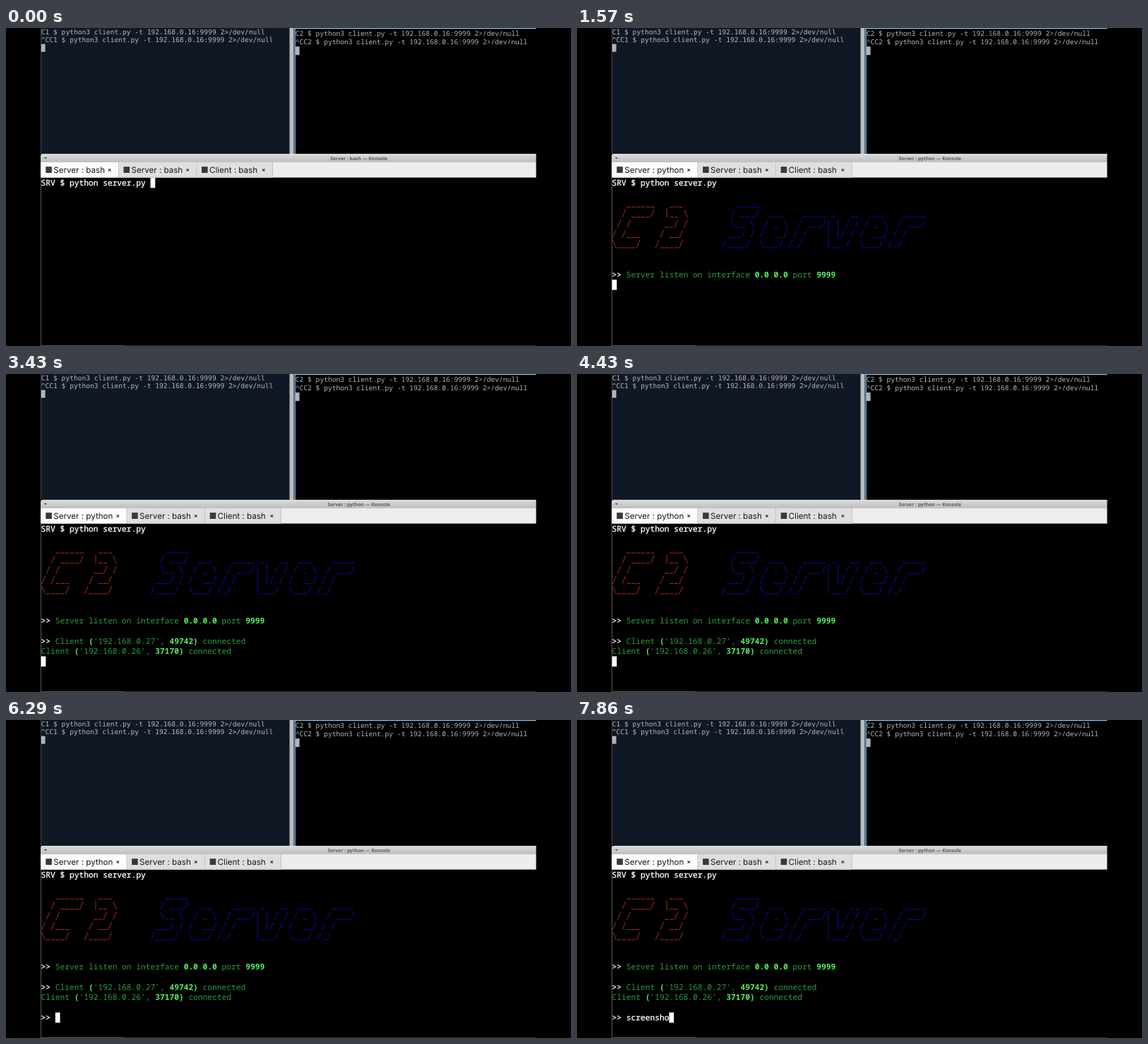
An HTML page with a canvas that plays this animation: 800 px wide and 450 px high, repeating every 8 s.

```html
<!DOCTYPE html>
<html lang="en">
<head>
<meta charset="utf-8">
<title>Terminal session</title>
<style>
html, body { margin: 0; width: 100%; height: 100%; overflow: hidden; background: #000; }
canvas { display: block; width: 800px; height: 450px; }
</style>
</head>
<body>
<canvas id="stage" width="800" height="450"></canvas>
<script>
const ctx = document.getElementById('stage').getContext('2d');
const LOOP = 8000;
const WHITE = '#fcfcfc', GREEN = '#2f9c3c', BRIGHT = '#54f060', RED = '#b62d1f', BLUE = '#0e0eae';
const EDGE = 750.6, BAR_BOTTOM = 211.6;

// Moments at which the terminal output changes, in ms
const AT = { enter: 860, title: 1140, banner: 1430, prompt: 2860, first: 3140, second: 3290, again: 4710 };
const TYPED = 'screensho';
const typingTimes = [...TYPED].map((_, i) => i ? 6710 + 143.5 * i : 6570);

const C2_ART = [
  '   ______   ___',
  '  / ____/  |__ \\',
  ' / /       __/ /',
  '/ /___    / __/',
  '\\____/   /____/'
];
const SERVER_ART = [
  '   _____',
  '  / ___/  ___    _____ _   __  ___    _____',
  '  \\__ \\  / _ \\  / ___/| | / / / _ \\  / ___/',
  ' ___/ / /  __/ / /    | |/ / /  __/ / /',
  '/____/  \\___/ /_/     |___/  \\___/ /_/'
];

// Line ends of the banner's characters, as x in a cell and y from the baseline
const STROKES = {
  '_': [0.5, 1.6, 6.2, 1.6],
  '/': [1, 1.9, 5.8, -9.2],
  '\\': [1, -9.2, 5.8, 1.9],
  '|': [3.4, 2.5, 3.4, -10.4]
};

const main = { x: 49.6, base: 222.8, top: 211.9, cell: 6.735, line: 14.43, size: 11.225, font: '"Noto Sans Mono", monospace' };
const left = { x: 49.8, base: 9.3, top: 0.7, cell: 5.764, line: 11, size: 9.57, font: '"DejaVu Sans Mono", monospace' };
const right = { x: 409.8, base: 11.3, top: 2.2, cell: 5.764, line: 12, size: 9.607, font: '"Noto Sans Mono", monospace' };

function rect(x, y, w, h, color) {
  ctx.fillStyle = color;
  ctx.fillRect(x, y, w, h);
}

function line(x1, y1, x2, y2) {
  ctx.beginPath();
  ctx.moveTo(x1, y1);
  ctx.lineTo(x2, y2);
  ctx.stroke();
}

// Writes text on a terminal's character grid and returns the next column
function write(term, row, col, text, color, weight = 400) {
  ctx.font = `${weight === 700 ? 700 : 400} ${term.size}px ${term.font}`;
  ctx.textAlign = 'left';
  ctx.fillStyle = ctx.strokeStyle = color;
  ctx.lineWidth = 0.35;
  const y = term.base + row * term.line;
  for (const ch of text) {
    const x = term.x + col++ * term.cell;
    if (ch === ' ') continue;
    ctx.fillText(ch, x, y);
    if (weight === 500) ctx.strokeText(ch, x, y);
  }
  return col;
}

function writeSpans(row, spans) {
  let col = 0;
  for (const [text, color, weight] of spans) col = write(main, row, col, text, color, weight);
}

function cursor(term, row, col, color) {
  rect(term.x + col * term.cell, term.top + row * term.line, term.cell, term.line, color);
}

function clientPane(term, name) {
  const command = `${name} $ python3 client.py -t 192.168.0.16:9999 2>/dev/null`;
  write(term, 0, 0, command, '#b8b8b8');
  write(term, 1, 0, '^C' + command, '#b8b8b8');
  cursor(term, 2, 0, '#b4b4b4');
}

function drawTop() {
  rect(49, 0, 353, 178, '#111825');
  rect(49, 0, 0.6, 178, '#606468');
  rect(401.5, 0, 6, 178, '#b9bbc1');
  rect(408.3, 0, 1.6, 178, '#6fa9d4');
  rect(408.3, 0, EDGE - 408.3, 1.2, '#8fc1e6');
  clientPane(left, 'C1');
  clientPane(right, 'C2');
}

function tab(x, width, label, active) {
  rect(x, 190, width, BAR_BOTTOM - 190, active ? '#fcfcfc' : '#dfdfdf');
  if (!active) rect(x, BAR_BOTTOM - 1.5, width, 1.5, '#d2d2d2');
  rect(x + width - 0.5, 190, 1, BAR_BOTTOM - 190, '#bdbdbd');
  const icon = active ? 56.3 : x + 6;
  rect(icon, 196.2, 8.6, 8.8, '#38393b');
  ctx.font = '11.6px Inter, sans-serif';
  ctx.textAlign = 'left';
  ctx.fillStyle = '#18191a';
  ctx.fillText(label, icon + 11, 205.1);
  const cx = x + width - 12.8, cy = 201;
  ctx.strokeStyle = '#333';
  ctx.lineWidth = 1.2;
  line(cx - 1.7, cy - 1.7, cx + 1.7, cy + 1.7);
  line(cx + 1.7, cy - 1.7, cx - 1.7, cy + 1.7);
}

function drawWindow(job) {
  const shift = job === 'python' ? 11.6 : 0;
  const width = EDGE - 49;
  const bar = ctx.createLinearGradient(0, 178, 0, 190);
  bar.addColorStop(0, '#dcdcdc');
  bar.addColorStop(1, '#bebebe');
  ctx.fillStyle = bar;
  ctx.beginPath();
  ctx.roundRect(49, 178, width, 12, [3, 0, 0, 0]);
  ctx.fill();
  ctx.fillStyle = '#444';
  ctx.beginPath();
  ctx.moveTo(53.8, 183);
  ctx.lineTo(58, 183);
  ctx.lineTo(55.9, 185.3);
  ctx.fill();
  ctx.font = 'bold 6.8px "Noto Sans", sans-serif';
  ctx.textAlign = 'center';
  ctx.fillStyle = '#5a5a5a';
  ctx.fillText(`Server : ${job} — Konsole`, 499.7, 186.7);

  rect(49, 190, width, BAR_BOTTOM - 190, '#ededed');
  tab(49, 110.5 + shift, 'Server : ' + job, true);
  tab(160.5 + shift, 109.5, 'Server : bash', false);
  tab(271 + shift, 106.5, 'Client : bash', false);

  rect(49, BAR_BOTTOM, 0.8, 450 - BAR_BOTTOM, '#707070');
  rect(49, 449, 119, 1, '#585858');
  rect(168, 449, EDGE - 168, 1, '#2e2e2e');
}

function drawArt(rows, startCol, color) {
  ctx.strokeStyle = color;
  ctx.lineWidth = 0.95;
  rows.forEach((text, i) => {
    const y = main.base + (2 + i) * main.line;
    [...text].forEach((ch, col) => {
      if (ch === ' ') return;
      const x = main.x + (startCol + col) * main.cell;
      const [x1, y1, x2, y2] = STROKES[ch];
      line(x + x1, y + y1, x + x2, y + y2);
    });
  });
}

function drawBanner() {
  drawArt(C2_ART, 0, RED);
  drawArt(SERVER_ART, 23, BLUE);
  writeSpans(9, [
    ['>> ', WHITE, 500], ['Server listen on interface ', GREEN], ['0.0', BRIGHT, 700], ['.', GREEN],
    ['0.0', BRIGHT, 700], [' port ', GREEN], ['9999', BRIGHT, 700]
  ]);
}

function client(row, prefix, address, port) {
  writeSpans(row, [
    [prefix, WHITE, 500], ['Client ', GREEN], ['(', BRIGHT, 700], [`'${address}', `, GREEN],
    [port + ')', BRIGHT, 700], [' connected', GREEN]
  ]);
}

function drawSession(t) {
  let place = [0, 23];
  write(main, 0, 0, 'SRV $ python server.py', WHITE, 500);
  if (t >= AT.enter) place = [1, 0];
  if (t >= AT.banner) {
    drawBanner();
    place = [10, 0];
  }
  if (t >= AT.prompt) {
    if (t < AT.first) write(main, 11, 0, '>>', WHITE, 500);
    place = [11, 3];
  }
  if (t >= AT.first) {
    client(11, '>> ', '192.168.0.27', 49742);
    place = [12, 0];
  }
  if (t >= AT.second) {
    client(12, '', '192.168.0.26', 37170);
    place = [13, 0];
  }
  if (t >= AT.again) {
    const count = typingTimes.filter(time => t >= time).length;
    place = [14, write(main, 14, 0, '>> ' + TYPED.slice(0, count), WHITE, 500)];
  }
  cursor(main, ...place, '#fff');
}

function frame() {
  const t = performance.now() % LOOP;
  ctx.textBaseline = 'alphabetic';
  ctx.textRendering = 'geometricPrecision';
  ctx.lineJoin = 'round';
  rect(0, 0, 800, 450, '#000');
  drawTop();
  drawWindow(t >= AT.title ? 'python' : 'bash');
  drawSession(t);
  requestAnimationFrame(frame);
}
frame();
</script>
</body>
</html>
```
